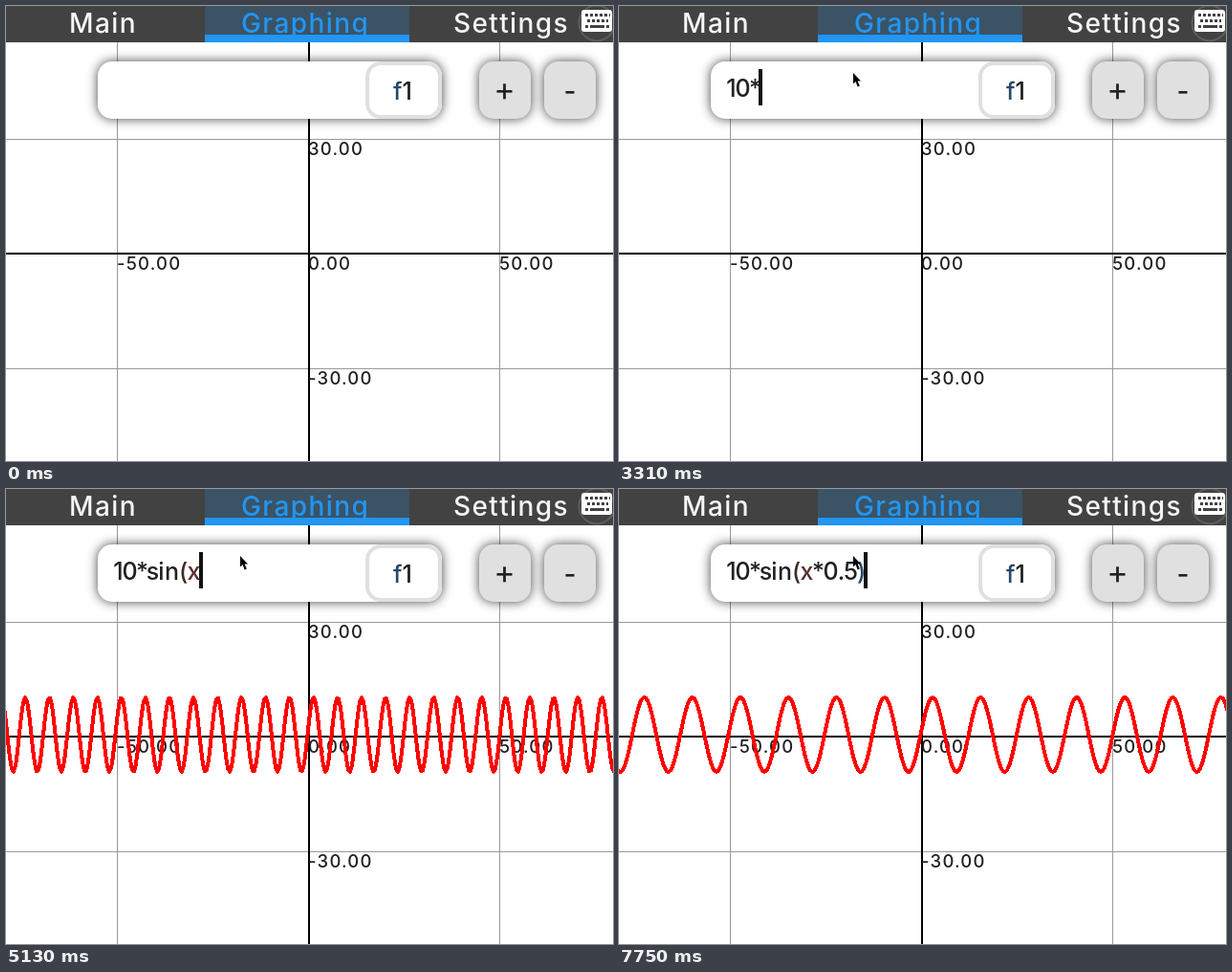
These frames come from a looping animation (635 by 476 pixels, 8 s). An HTML page:

```html
<!DOCTYPE html>
<html lang="en">
<head>
<meta charset="utf-8">
<title>Graphing calculator</title>
<style>
html, body { margin: 0; width: 100%; height: 100%; overflow: hidden; background: #fff; }
svg { display: block; }
text { font-family: Inter, "DejaVu Sans", sans-serif; font-weight: 500; fill: #212121; white-space: pre; }
.tab { font-size: 28px; letter-spacing: 1.4px; fill: #f5f5f5; }
.label { font-size: 18.5px; letter-spacing: 1.2px; }
.mid { text-anchor: middle; }
.field { font-size: 25px; }
.sign { font-size: 34px; font-weight: 400; }
.raised { filter: drop-shadow(0 0 6px #000b); }
</style>
</head>
<body>
<svg width="635" height="476" viewBox="0 0 635 476">
  <path d="M116.5 38V476M516.5 38V476M0 139.5H635M0 379.5H635" stroke="#999"/>
  <path d="M317 38V476M0 259H635" stroke="#000" stroke-width="2"/>
  <g class="label">
    <text x="316" y="156">30.00</text>
    <text x="316" y="276">0.00</text>
    <text x="316" y="396">-30.00</text>
    <text x="116" y="276">-50.00</text>
    <text x="516" y="276">50.00</text>
  </g>
  <path id="graph" fill="none" stroke="#f00" stroke-width="4" stroke-linejoin="round" shape-rendering="crispEdges"/>

  <rect width="635" height="38" fill="#424242"/>
  <rect x="208" width="214" height="38" fill="#3b5365"/>
  <rect x="208" y="30" width="214" height="8" fill="#2196f3"/>
  <text class="tab" x="66" y="28">Main</text>
  <text class="tab" x="246" y="28" style="fill:#2196f3">Graphing</text>
  <text class="tab" x="468" y="28">Settings</text>
  <circle cx="618" cy="18" r="18.5" fill="#424242" stroke="#5c5c5c" stroke-width="2"/>
  <rect x="602" y="4" width="32" height="23" rx="3" fill="#fff"/>
  <path d="M606 9.5H632M608 15.5H630M606 21.5H609M628 21.5H631" stroke="#424242" stroke-width="3" stroke-dasharray="3 2"/>
  <path d="M611 21.5H626" stroke="#424242" stroke-width="3"/>

  <rect class="raised" x="96" y="58" width="360" height="60" rx="15" fill="#fff"/>
  <rect x="378" y="60" width="76" height="56" rx="14" fill="#fff" stroke="#e0e0e0" stroke-width="4"/>
  <text class="field" x="405" y="98"><tspan fill="#28486a">f</tspan>1</text>
  <g fill="#e0e0e0">
    <rect class="raised" x="495" y="58" width="54" height="60" rx="15"/>
    <rect class="raised" x="563" y="58" width="54" height="60" rx="15"/>
  </g>
  <text class="sign mid" x="521.5" y="99">+</text>
  <text class="sign mid" x="590" y="99" style="font-size:28px;font-weight:500">-</text>

  <text id="formula" class="field mid" y="95"></text>
  <rect id="caret" y="66" width="4" height="38" fill="#111"/>
  <path id="pointer" d="M0 0V11.5L2.6 9L4.6 14.5L6.8 13.5L4.6 8.4H8Z" fill="#000"/>
</svg>
<script>
const LOOP = 8000;
const FORMULA = "10*sin(x*0.5)";
const stops = [112, 120, 136, 146, 158, 164, 180, 188, 202, 212, 228, 234, 248, 256];
const tints = { "(": "#3f2c28", x: "#5a3030", ")": "#28486a" };

// [time, characters typed, caret shown]
const steps = [
  [0, 0, 0], [2410, 1, 1], [2610, 2, 1], [3010, 2, 0], [3210, 3, 1], [3610, 3, 0],
  [4030, 5, 1], [4130, 6, 1], [4330, 7, 1], [4730, 7, 0], [5130, 8, 1], [5430, 8, 0],
  [5830, 8, 1], [6240, 8, 0], [6440, 9, 1], [6740, 10, 1], [7140, 11, 1],
  [7340, 12, 1], [7650, 12, 0], [7750, 13, 1]
];

const flat = value => `M0 ${258 - 4 * value}H635`;

function wave(frequency) {
  const points = [];
  for (let x = -2; x <= 638; x += 2) {
    points.push(`${x} ${(257 - 39 * Math.sin((x - 315.5) / 4 * frequency)).toFixed(2)}`);
  }
  return "M" + points.join("L");
}

// Plots by number of characters typed; other lengths do not parse
const plots = {
  1: flat(1), 2: flat(10), 8: wave(1), 10: flat(0), 11: flat(0), 12: wave(0.5), 13: wave(0.5)
};

const [graph, formula, caret, pointer] =
  ["graph", "formula", "caret", "pointer"].map(id => document.getElementById(id));

const glyphs = [...FORMULA].map((char, i) => {
  const span = document.createElementNS("http://www.w3.org/2000/svg", "tspan");
  span.setAttribute("x", (stops[i] + stops[i + 1]) / 2 + 1.5);
  span.setAttribute("fill", tints[char] || "#212121");
  span.textContent = char;
  formula.append(span);
  return span;
});

function drawPointer(t) {
  const p = Math.min(1, Math.floor((t - 200) / 100) / 6);
  const ease = p * p * (3 - 2 * p);
  pointer.style.display = t < 200 ? "none" : "";
  pointer.setAttribute("transform", `translate(${456 - 211 * ease} ${346 - 276 * ease})`);
}

let shown;
function draw() {
  const t = performance.now() % LOOP;
  const step = steps.findLast(([start]) => start <= t);
  drawPointer(t);
  if (step !== shown) {
    shown = step;
    const [, count, caretOn] = step;
    graph.setAttribute("d", plots[count] || "");
    glyphs.forEach((span, i) => span.style.visibility = i < count ? "visible" : "hidden");
    caret.setAttribute("x", stops[count]);
    caret.style.display = caretOn ? "" : "none";
  }
  requestAnimationFrame(draw);
}
draw();
</script>
</body>
</html>
```
